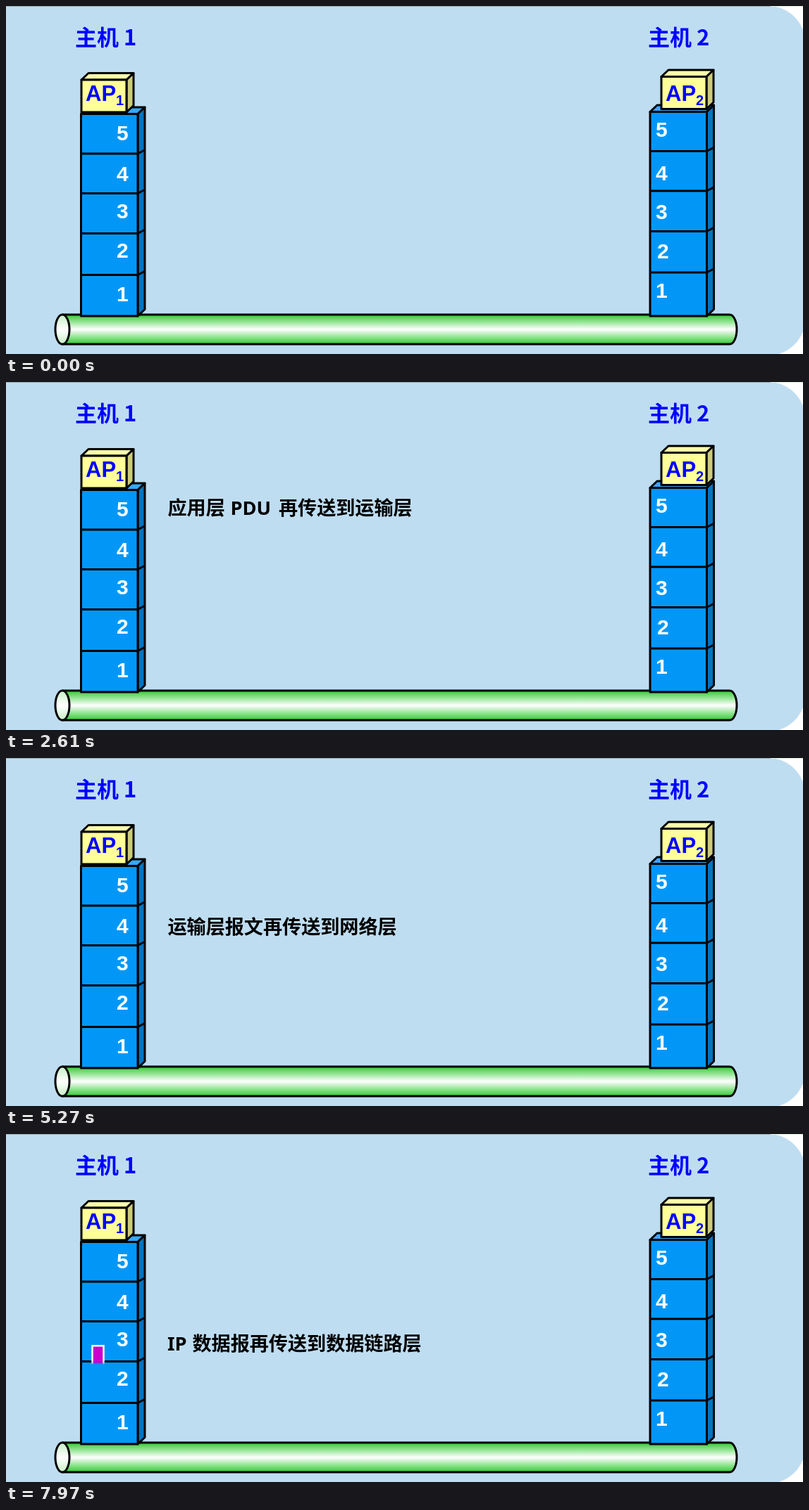
An HTML page for the animation above (8000 ms loop, 1131 by 495 pixels).

```html
<!DOCTYPE html>
<html lang="zh-CN">
<head>
<meta charset="utf-8">
<title>主机之间的数据传送</title>
<style>
  html, body { margin: 0; width: 100%; height: 100%; overflow: hidden; background: #fff; }
  svg { display: block; width: 1131px; height: 495px; }
  text { font-weight: 700; white-space: pre; }
  .note { font-family: "Noto Sans", "Noto Sans CJK SC", "Noto Sans CJK JP", "Noto Sans CJK", sans-serif; font-size: 27.1px; }
  .title { font-family: "Noto Sans CJK SC", "Noto Sans CJK JP", "Noto Sans CJK", sans-serif; font-size: 31px; fill: #00f; }
  .digit, .ap { font-family: "Liberation Sans", Arial, sans-serif; }
  .digit { font-size: 30px; fill: #fff; }
  .ap { font-size: 31px; fill: #00f; }
  .edge { stroke: #000; stroke-width: 3; stroke-linejoin: round; }
</style>
</head>
<body>
<svg id="stage" viewBox="0 0 1131 495">
  <defs>
    <linearGradient id="pipe" x2="0" y2="1">
      <stop offset="0" stop-color="#2ecb2e"/><stop offset=".5" stop-color="#fff"/><stop offset="1" stop-color="#2ecb2e"/>
    </linearGradient>
    <linearGradient id="lid" x2="0" y2="1">
      <stop offset="0" stop-color="#c4f2c4"/><stop offset=".5" stop-color="#fff"/><stop offset="1" stop-color="#c4f2c4"/>
    </linearGradient>
    <linearGradient id="soft" x2="0" y2="1">
      <stop offset=".95" stop-color="#fff"/><stop offset="1" stop-color="#000"/>
    </linearGradient>
    <mask id="wipe" maskUnits="userSpaceOnUse" x="100" y="0" width="60" height="495">
      <rect id="wipeRect" x="100" width="60" height="80" fill="url(#soft)"/>
    </mask>
  </defs>
  <rect x="-60" width="1194" height="497" rx="52" fill="#bfddf1"/>
  <path d="M0 .5H1085" stroke="#8fa9b8"/>
  <path d="M1085 .5H1131" stroke="#d5efcf"/>
  <path class="edge" d="M80 439H1027A10 21 0 0 1 1027 481H80Z" fill="url(#pipe)"/>
  <ellipse class="edge" cx="80" cy="460" rx="10" ry="21" fill="url(#lid)"/>
</svg>
<script>
const LOOP = 8000, STEP = 76;
const stage = document.getElementById("stage");
const wipeRect = document.getElementById("wipeRect");

function add(parent, tag, attrs, text = "") {
  const node = document.createElementNS("http://www.w3.org/2000/svg", tag);
  for (const key in attrs) node.setAttribute(key, attrs[key]);
  node.textContent = text;
  parent.append(node);
  return node;
}
const label = (parent, cls, x, y, text) => add(parent, "text", { class: cls, x, y }, text);
const edge = (d, fill) => add(stage, "path", { class: "edge", d, fill });

// Box with its front face at x, y and the depth going up and right
function box(x, y, w, h, [front, top, side]) {
  edge(`M${x} ${y}l10 -9.5h${w}l-10 9.5z`, top);
  edge(`M${x + w} ${y}l10 -9.5v${h}l-10 9.5z`, side);
  edge(`M${x} ${y}h${w}v${h}h${-w}z`, front);
}

function host(name, titleX, x, top, seams, digits, apX, apY) {
  label(stage, "title", titleX, 56, "主机 " + name);
  box(x, top, 80.5, 441 - top, ["#0297f7", "#35a9f8", "#0274c2"]);
  for (const y of seams) edge(`M${x} ${y}h80.5l10.5 -5.5`, "none");
  digits.forEach(([dx, y], i) => label(stage, "digit", dx, y, 5 - i));
  box(apX, apY, 64, 46, ["#ffff99", "#ffffad", "#cccc7a"]);
  label(stage, "ap", apX + 6, 134.5, "AP");
  label(stage, "ap", apX + 49, 140.5, name).style.fontSize = "20px";
}
host("1", 98, 106.5, 153.5, [210, 266.5, 323.5, 382.5],
  [[157, 191], [157, 249], [157, 302], [157, 358], [157, 420]], 107, 105);
host("2", 911, 914, 150.5, [206.5, 263, 320.5, 379],
  [[922, 186], [922, 248], [922, 303], [924, 359], [922, 415]], 930, 100.5);

// Each run is an x position followed by its text
function note(parent, y, ...runs) {
  for (let i = 0; i < runs.length; i += 2) label(parent, "note", runs[i], y, runs[i + 1]);
}
const arrow = (parent, top) => add(parent, "path", {
  d: `M122.5 ${top + 1.2}h16v39.8h8.5l-16.5 14.2l-16.5 -14.2h8.5z`,
  fill: "#cc00cc", stroke: "#fff", "stroke-width": 2.5
});

const scenes = [];
function scene(from, to) {
  const group = add(stage, "g", {});
  const item = { from, to, group };
  scenes.push(item);
  return item;
}

const intro = scene(450, 2610);
arrow(intro.group, 141.5);
note(intro.group, 118, 233, "应用进程数据先传送到应用层");
note(intro.group, 165, 233, "加上应用层首部，成为应用层", 592, "PDU");
add(intro.group, "rect", { x: 233.5, y: 185.5, width: 638, height: 120, fill: "#ccffff", stroke: "#2a3fa8", "stroke-width": 1.4 });
note(intro.group, 222, 247, "PDU (Protocol Data Unit)", 590.5, "：协议数据单元。");
note(intro.group, 258, 247, "OSI", 302, "参考模型把对等层次之间传送的数据单位称为");
note(intro.group, 295, 247, "该层的协议数据单元", 498.5, "PDU", 559.5, "。");
intro.fade = { node: intro.group, start: 450, steps: 6 };

function transfer(from, to, wipeStart, top, fadeStart, first, second) {
  const item = scene(from, to);
  note(item.group, ...first);
  const holder = add(item.group, "g", { mask: "url(#wipe)" });
  arrow(holder, top);
  item.wipe = { start: wipeStart, top };
  if (second) {
    const node = add(item.group, "g", {});
    note(node, ...second);
    item.fade = { node, start: fadeStart, steps: 2 };
  }
}
transfer(2610, 5270, 3400, 182, 4250,
  [189, 229.5, "应用层", 318.5, "PDU", 387, "再传送到运输层"],
  [247.5, 229, "加上运输层首部，成为运输层报文"]);
transfer(5270, 7340, 5810, 241.5, 6670,
  [250, 229.5, "运输层报文再传送到网络层"],
  [308, 229, "加上网络层首部，成为", 506.5, "IP", 543, "数据报（或分组）"]);
transfer(7340, LOOP, 7740, 300, 0,
  [308, 229, "IP", 264.5, "数据报再传送到数据链路层"]);

const stepsDone = (t, start) => Math.max(0, Math.floor((t - start) / STEP) + 1);

function draw(now) {
  const t = now % LOOP;
  for (const { from, to, group, wipe, fade } of scenes) {
    const active = t >= from && t < to;
    group.style.display = active ? "" : "none";
    if (!active) continue;
    if (fade) fade.node.style.opacity = Math.min(1, stepsDone(t, fade.start) / fade.steps);
    if (wipe) {
      const n = stepsDone(t, wipe.start);
      const reach = n ? 2 + 6 * Math.min(n, 11) : -10;
      wipeRect.setAttribute("y", wipe.top + reach - 78);
    }
  }
}

const began = performance.now();
function tick() {
  draw(performance.now() - began);
  requestAnimationFrame(tick);
}
tick();
</script>
</body>
</html>
```
